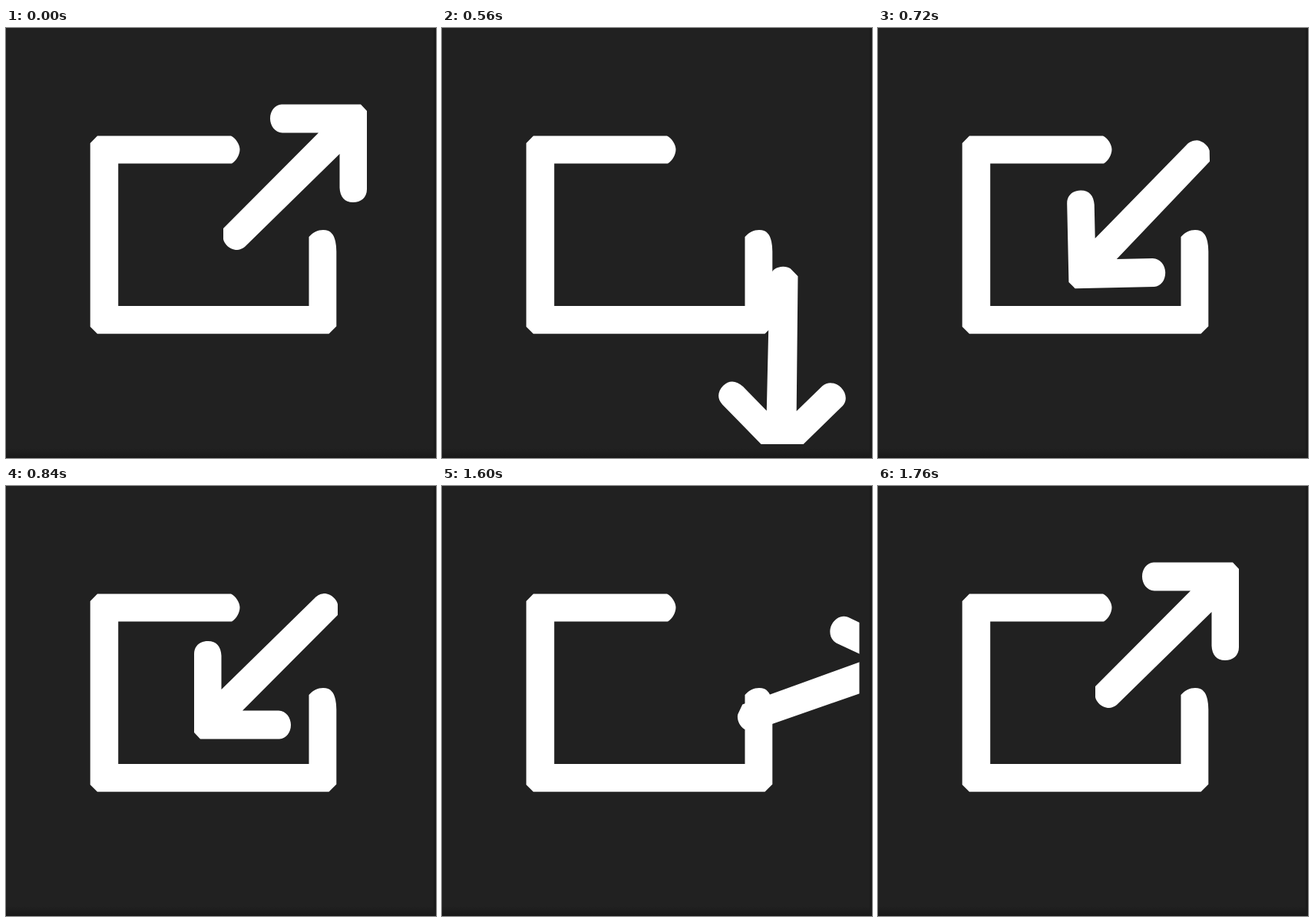
An HTML page that plays this animation: 560x560 px, repeating every 2.12 s.

```html
<!DOCTYPE html>
<html lang="en">
<head>
<meta charset="utf-8">
<title>Export and import icon</title>
<style>
  html, body { margin: 0; width: 100%; height: 100%; overflow: hidden; background: #212121; }
  svg { display: block; width: 100%; height: 100%; }
</style>
</head>
<body>
<svg viewBox="0 0 560 560">
  <defs>
    <clipPath id="area"><rect width="543.5" height="542"/></clipPath>
    <linearGradient id="edge" x2="0" y2="1">
      <stop stop-color="#212121"/>
      <stop offset="1" stop-color="#181818"/>
    </linearGradient>
  </defs>
  <rect width="560" height="560" fill="#212121"/>
  <rect y="547" width="560" height="13" fill="url(#edge)"/>
  <rect x="557" width="3" height="560" fill="#1b1b1b"/>
  <path fill="#fff" d="M119 140.5H293C299 143 304.500 152 304.500 158C304.500 165 300 173 294 176.500H146.200V362H394.500V272C400 266 406 263 413 263C423 263 427 269 429 278Q430.300 284 430.300 291V388.500L420.500 398.300H119L109.700 389V150Z"/>
  <g clip-path="url(#area)">
    <path id="arrow" fill="#fff" d="M359 99.500H462L470 108V210C470 221 462 227 452 227C441 227 435 220 434.500 208V164L313 283C309 287 305 289 299 289C291 288 284 281 283 275V261L407 136.500H360C350 136 344 127 344 118C344 108 350 100 359 99.500Z"/>
  </g>
</svg>
<script>
  const LOOP = 2120, STEP = 40, DURATION = 280;
  const IN_START = 480, OUT_START = 1480;
  const mid = { x: 357.5, y: 214.5 };    // halfway between both poses
  const swing = { x: -222, y: 188 };     // turning point relative to mid
  const arrow = document.getElementById('arrow');

  // cubic-bezier(0, .65, .4, 1)
  function ease(x) {
    if (x <= 0) return 0;
    if (x >= 1) return 1;
    let lo = 0, hi = 1;
    for (let i = 0; i < 24; i++) {
      const s = (lo + hi) / 2;
      if (1.2 * (1 - s) * s * s + s ** 3 < x) lo = s; else hi = s;
    }
    const r = 1 - lo;
    return 1.95 * r * r * lo + 3 * r * lo * lo + lo ** 3;
  }

  const progress = (t, start) => ease((t - start) / DURATION);

  function render(ms) {
    const t = Math.floor((ms % LOOP) / STEP) * STEP;
    const p = progress(t, IN_START) - progress(t, OUT_START);
    const k = 1 - 2 * p;
    arrow.setAttribute('transform',
      `translate(${mid.x + swing.x * k} ${mid.y + swing.y * k}) rotate(${180 * p}) ` +
      `translate(${-mid.x - swing.x} ${-mid.y - swing.y})`);
  }

  const begin = performance.now();
  function tick() {
    render(performance.now() - begin);
    requestAnimationFrame(tick);
  }
  tick();
</script>
</body>
</html>
```
